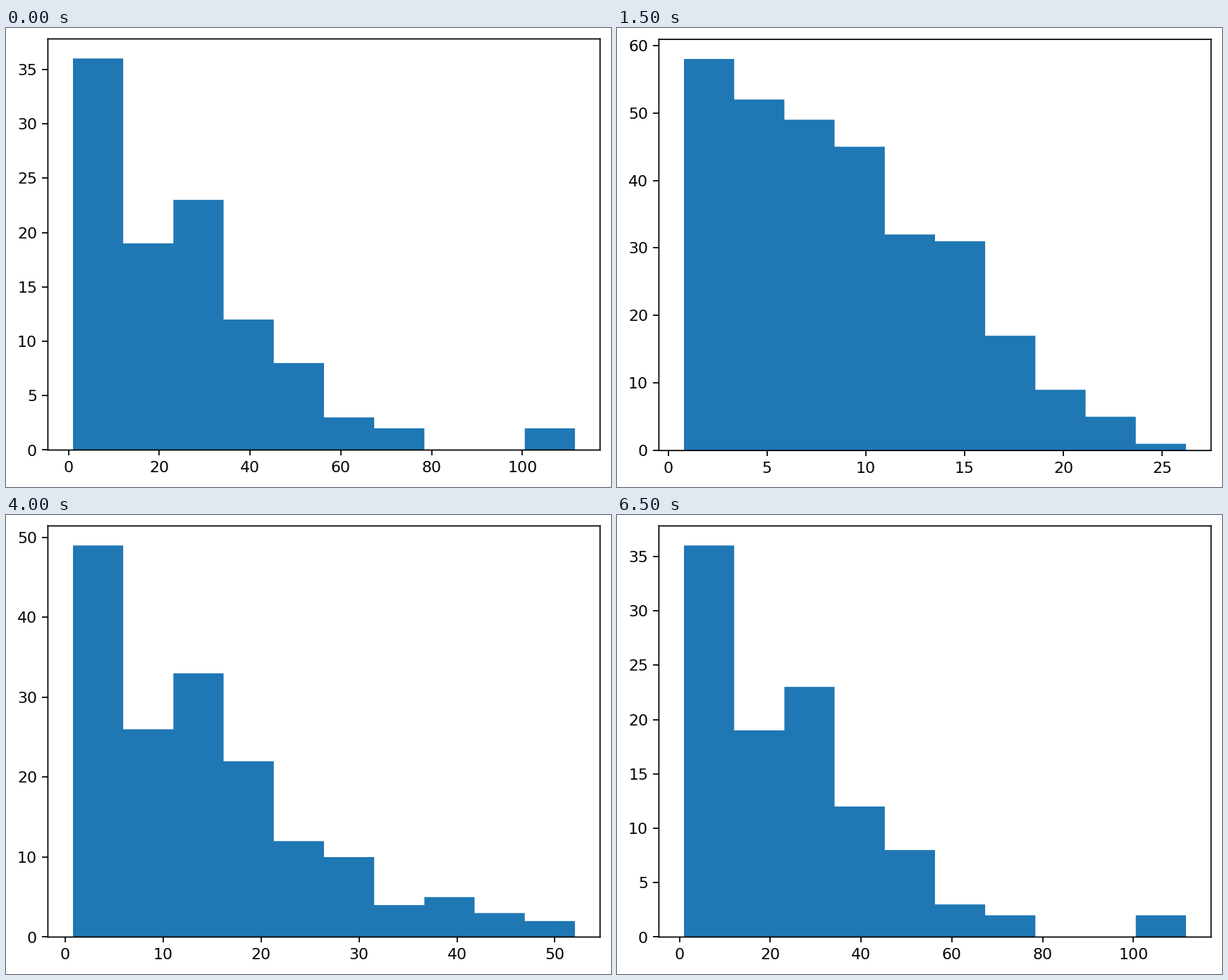
Write a matplotlib script that moves like this. It is 858 px wide and 652 px high and loops after 8 s.

```python
import numpy as np
import matplotlib.pyplot as plt
from matplotlib.animation import FuncAnimation

WIDTH, HEIGHT, DPI = 858, 652, 158
AXES_W, AXES_H = 783.1, 584
LEFT, BOTTOM = 59.4, 52.5       # axes corner beside two-digit labels
DIGIT_W, LABEL_HALF = 13.6, 9.3
STEP_MS, FRAMES, LAST_STEP = 500, 16, 13

# Key histograms; the steps between them are blended.
KEYS = {
    1: (107, 93, 90, 54, 26, 6, 2, 2, 0, 1),
    3: (58, 52, 49, 45, 32, 31, 17, 9, 5, 1),
    6: (62, 34, 50, 31, 13, 6, 4, 1, 0, 1),
    9: (43, 22, 25, 17, 12, 12, 4, 7, 5, 2),
    11: (44, 19, 25, 16, 8, 8, 4, 2, 1, 1),
    13: (36, 19, 23, 12, 8, 3, 2, 0, 0, 2),
}
# Largest value at the steps where its growth changes pace.
LARGEST = {1: 26.43, 2: 24.07, 3: 26.2, 4: 30, 6: 52.57,
           7: 50.1, 9: 53.99, 11: 79.35, 13: 111.6}

plt.rcParams["path.snap"] = False
fig = plt.figure(figsize=((WIDTH + 1e-6) / DPI, (HEIGHT + 1e-6) / DPI),
                 dpi=DPI, facecolor="white")
ax = fig.add_axes([0, 0, AXES_W / WIDTH, AXES_H / HEIGHT])


def blend(keys, step):
    return np.interp(step, list(keys), list(keys.values()))


def histogram(step):
    counts = [np.interp(step, list(KEYS), column)
              for column in zip(*KEYS.values())]
    smallest = blend({11: 0.8, 13: 1.0}, step)
    edges = np.linspace(smallest, blend(LARGEST, step), len(counts) + 1)
    return np.round(counts), edges


def place_axes():
    """Make room for wide labels and for a top label above the frame."""
    top = ax.get_ylim()[1]
    last_tick = max(tick for tick in ax.get_yticks() if tick <= top)
    extra_digits = len(f"{last_tick:.0f}") - 2
    gap = (1 - last_tick / top) * AXES_H
    left = LEFT + DIGIT_W * extra_digits
    bottom = BOTTOM - max(0, LABEL_HALF - gap)
    ax.set_position([left / WIDTH, bottom / HEIGHT,
                     AXES_W / WIDTH, AXES_H / HEIGHT])


def draw(frame):
    # The loop opens on the histogram it ends with.
    step = min((frame - 1) % FRAMES + 1, LAST_STEP)
    ax.clear()
    ax.stairs(*histogram(step), fill=True, color="#1f77b4")
    place_axes()
    return ax.patches


anim = FuncAnimation(fig, draw, frames=FRAMES, init_func=lambda: draw(0),
                     interval=STEP_MS, repeat=True, repeat_delay=0, blit=False)
plt.show()
```
